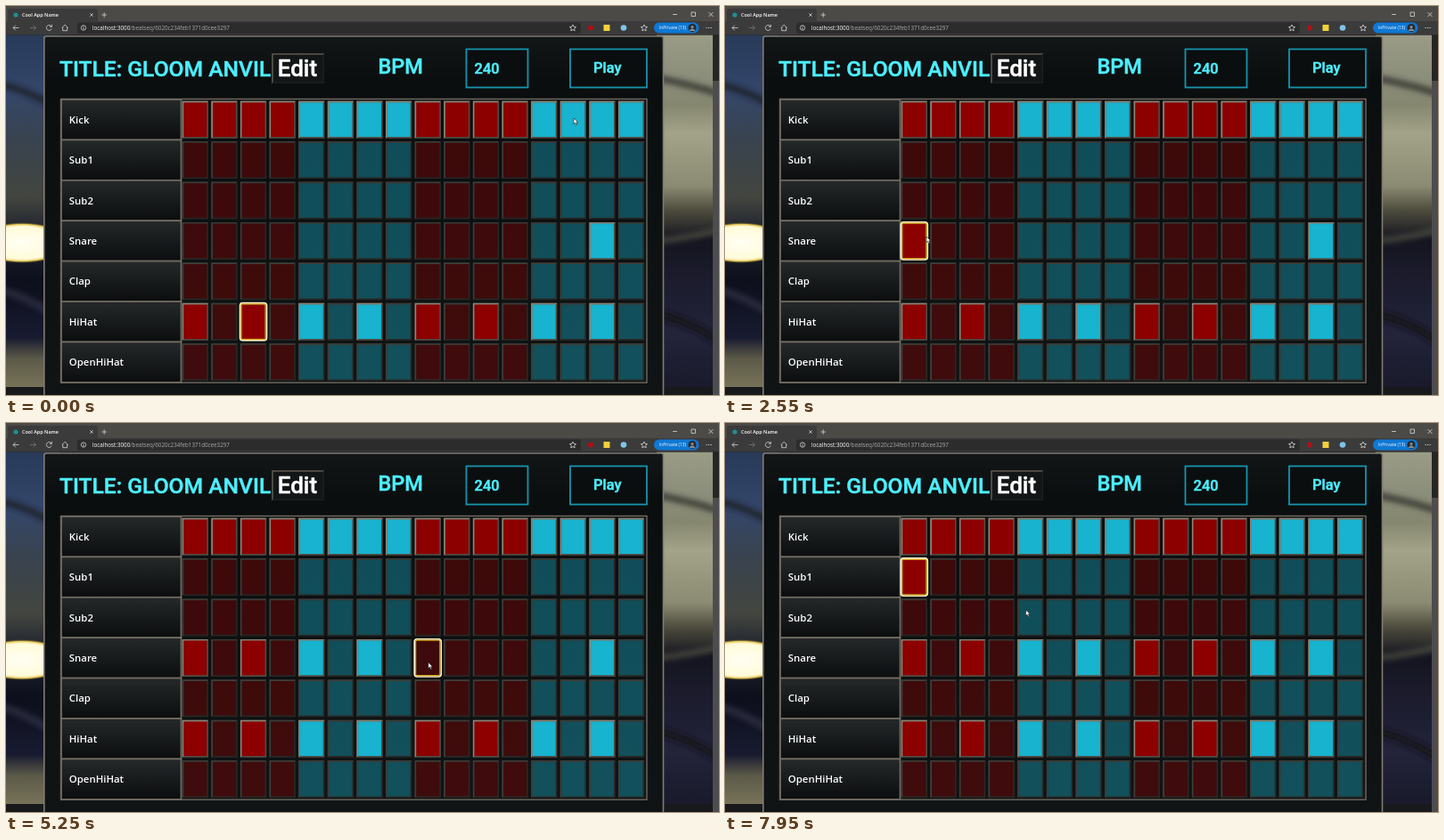
An HTML page for the animation above (8 s loop, 800 by 437 pixels).

```html
<!DOCTYPE html>
<html lang="en">
<head>
<meta charset="utf-8">
<title>Cool App Name</title>
<style>
  html, body { margin: 0; width: 100%; height: 100%; overflow: hidden; background: #17191b; }
  svg { display: block; width: 100vw; height: 100vh; }
  text { white-space: pre; }
  .ui { font-family: "Open Sans", "Noto Sans", sans-serif; }
  .head { font-family: Roboto, "Liberation Sans", sans-serif; font-weight: 500; fill: #4cf0ff; }
  .head text { stroke: #4cf0ff; stroke-width: .5; stroke-linejoin: round; }
  .head .edit { fill: #fff; stroke: #fff; }
  .label { font-size: 11.4px; font-weight: 600; fill: #fff; }
  .icon { fill: none; stroke: #d6d6d6; stroke-width: .8; }
</style>
</head>
<body>
<svg viewBox="0 0 800 437" preserveAspectRatio="none">
  <defs>
    <linearGradient id="panel" x2="0" y2="1">
      <stop offset="0" stop-color="#121617"/><stop offset=".12" stop-color="#0b0e0f"/>
      <stop offset="1" stop-color="#101415"/>
    </linearGradient>
    <linearGradient id="row" x2="0" y2="1">
      <stop offset="0" stop-color="#25292a"/><stop offset="1" stop-color="#0b0d0e"/>
    </linearGradient>
    <linearGradient id="left" x2="0" y2="1">
      <stop offset="0" stop-color="#283a58"/><stop offset=".16" stop-color="#34466a"/>
      <stop offset=".3" stop-color="#39434f"/><stop offset=".46" stop-color="#43463f"/>
      <stop offset=".55" stop-color="#22262f"/><stop offset=".7" stop-color="#0d0f1c"/>
      <stop offset=".86" stop-color="#181a30"/><stop offset=".92" stop-color="#5c5a48"/>
      <stop offset="1" stop-color="#777258"/>
    </linearGradient>
    <linearGradient id="right" x2="0" y2="1">
      <stop offset="0" stop-color="#9a9c86"/><stop offset=".12" stop-color="#8b8e7a"/>
      <stop offset=".2" stop-color="#85876f"/><stop offset=".28" stop-color="#a2a388"/>
      <stop offset=".43" stop-color="#8b8b73"/><stop offset=".5" stop-color="#4c4b3d"/>
      <stop offset=".58" stop-color="#14151f"/><stop offset=".7" stop-color="#1c1c2e"/>
      <stop offset=".85" stop-color="#23233a"/><stop offset="1" stop-color="#1a1a2c"/>
    </linearGradient>
    <radialGradient id="lamp">
      <stop offset="0" stop-color="#fffff4"/><stop offset=".8" stop-color="#fffbd8"/>
      <stop offset=".9" stop-color="#e6c95a"/><stop offset="1" stop-color="#5a4a18" stop-opacity="0"/>
    </radialGradient>
    <filter id="soft"><feGaussianBlur stdDeviation="3"/></filter>
    <clipPath id="photo"><path d="M0 32.500H793V428H0Z"/></clipPath>
  </defs>

  <!-- page backdrop -->
  <g clip-path="url(#photo)">
    <path d="M0 32H60V428H0Z" fill="url(#left)"/>
    <path d="M730 32H793V428H730Z" fill="url(#right)"/>
    <g filter="url(#soft)" fill="none">
      <path d="M-10 88Q20 92 60 116" stroke="#1b212b" stroke-width="7"/>
      <path d="M-10 318Q24 326 60 352" stroke="#2a2b3c" stroke-width="8"/>
      <path d="M725 80Q765 87 805 100" stroke="#3a3b36" stroke-width="7"/>
      <path d="M725 264Q765 262 805 250" stroke="#4a4a40" stroke-width="6"/>
      <path d="M725 345Q765 352 805 380" stroke="#12121d" stroke-width="9"/>
    </g>
    <ellipse cx="18" cy="266" rx="54" ry="23" fill="url(#lamp)"/>
  </g>
  <path d="M793 33H800V437H793Z" fill="#262626"/>
  <path d="M793 84H800V437H793Z" fill="#4d4d4f"/>

  <!-- browser bar -->
  <path d="M0 0H800V18H0Z" fill="#4b4a47"/>
  <path d="M0 17H800V32.500H0ZM2 17V6Q2 3 5 3H100Q103 3 103 6V17Z" fill="#3b3b3b"/>
  <rect x="80" y="18.500" width="565" height="12.500" rx="2" fill="#2c2c2c"/>
  <g class="ui">
    <text x="18" y="12" font-size="5.500" font-weight="600" fill="#fff">Cool App Name</text>
    <text x="97" y="27" font-size="6.270" fill="#aaa"><tspan fill="#fff">localhost:3000</tspan>/beatseq/6020c234feb1371d0cee3297</text>
    <rect x="727" y="18.500" width="50.500" height="12" rx="6" fill="#0f78d4"/>
    <text x="733" y="26.300" font-size="4.900" fill="#fff">InPrivate (13)</text>
  </g>
  <circle cx="11" cy="10" r="2.600" fill="#1f8f98"/>
  <circle cx="656" cy="24.500" r="3" fill="#b01018"/>
  <rect x="670.500" y="21" width="7" height="7" fill="#f2d13c"/>
  <circle cx="693" cy="24.500" r="3.300" fill="#7fc4e8"/>
  <circle cx="770" cy="24.500" r="4.500" fill="#252a30"/>
  <path d="M767 28Q767 25.500 770 25.500T773 28Z" fill="#8b8f94"/>
  <circle cx="770" cy="23.500" r="1.600" fill="#8b8f94"/>
  <g class="icon">
    <path d="M94.300 8.300l3.400 3.400m0-3.400l-3.400 3.400M107.500 10h5.400M110.200 7.300v5.400"/>
    <path d="M748 9.500h5M769 7h4.500v4.500H769ZM788.500 7l5 5m0-5l-5 5"/>
    <path d="M14.500 24.500H8m2.800-2.800L8 24.500l2.800 2.800M62.800 24.500l3.400-3.300 3.400 3.300M63.700 24v3.700h5V24"/>
    <path d="M27 24.500h6.500m-2.800-2.800l2.800 2.800-2.800 2.800" stroke="#777"/>
    <path d="M51 23a3 3 0 1 0 .2 2.500M51.400 20.800v2.500h-2.500"/>
    <circle cx="87" cy="24.500" r="2.700"/><path d="M87 24v2.200M87 22.700v.6"/>
    <path id="star" d="M716 21l1.100 2.300 2.500.3-1.900 1.700.5 2.500-2.200-1.200-2.200 1.200.5-2.500-1.900-1.700 2.500-.3Z"/>
    <use href="#star" x="-80"/>
    <path d="M785.500 24.500h1.200m1.300 0h1.200m1.300 0h1.200" stroke-width="1.100"/>
  </g>

  <!-- sequencer panel -->
  <rect x="42.800" y="34" width="694.700" height="420" rx="2.500" fill="url(#panel)" stroke="#817c73" stroke-width="1.600"/>
  <g class="head">
    <text x="60" y="79" font-size="24.600">TITLE: GLOOM ANVIL</text>
    <path d="M298 53H357V87H298Z" fill="#131617"/>
    <path d="M299 87V54H357" fill="none" stroke="#5d5952" stroke-width="1.600"/>
    <path d="M299 86.300H356.300V54" fill="none" stroke="#1c1f20" stroke-width="1.400"/>
    <text x="304.700" y="79" font-size="26" class="edit">Edit</text>
    <text x="417.500" y="76" font-size="23.500">BPM</text>
    <g fill="#0b0e0f" stroke="#1594ad" stroke-width="1.800">
      <rect x="516.500" y="48.500" width="69" height="43"/>
      <rect x="633" y="48.500" width="86" height="43"/>
    </g>
    <text x="525.500" y="75.700" font-size="16.500">240</text>
    <text x="659" y="75.300" font-size="16.500">Play</text>
  </g>
  <g id="grid"></g>
  <g id="ring" fill="none">
    <rect x="-.4" y="-.2" width="30" height="42.300" rx="3" stroke="#fff6d2" stroke-width="1.600"/>
    <rect x="1" y="1.200" width="27.200" height="39.500" rx="1.500" stroke="#dba614" stroke-width="1.200"/>
  </g>
  <path id="cursor" d="M0 0V6.600L1.600 5.200 2.700 7.700 3.900 7.200 2.800 4.800 4.900 4.700Z" fill="#fff" stroke="#111" stroke-width=".6"/>
</svg>
<script>
const NS = 'http://www.w3.org/2000/svg';
const $ = id => document.getElementById(id);
const LOOP = 8000, LEFT = 197.700, TOP = 105, COL = 32.620, ROW = 45.400;
const rows = ['Kick', 'Sub1', 'Sub2', 'Snare', 'Clap', 'HiHat', 'OpenHiHat'];

// Steps lit at the start
const lit = (r, c) => r === 0 || (r === 3 && c === 14) || (r === 5 && c % 2 === 0);

// Pressed at, lit at, row, column
const clicks = [
  [1900, 2200, 3, 0], [2900, 3000, 3, 2], [3600, 3700, 3, 4], [4450, 4550, 3, 6],
  [5200, 5300, 3, 8], [5800, 5900, 3, 10], [6650, 6750, 3, 12], [7500, 7600, 1, 0]
];

// Pointer: time, x, y
const path = [
  [0, 637, 126], [300, 507, 125], [600, 355, 208], [900, 279, 305], [1250, 212, 265],
  [2500, 212, 265], [2550, 226, 259], [2850, 276, 265], [3000, 277, 266], [3350, 342, 268],
  [3700, 344, 269], [4200, 401, 270], [4350, 408, 270], [4550, 409, 270], [4950, 473, 269],
  [5300, 474, 269], [5650, 538, 268], [5900, 539, 268], [6200, 600, 268], [6600, 604, 268],
  [6750, 603, 267], [7050, 380, 212], [7300, 214, 175], [7600, 215, 175], [7950, 337.500, 210]
];

function add(parent, tag, attrs, text) {
  const el = document.createElementNS(NS, tag);
  for (const k in attrs) el.setAttribute(k, attrs[k]);
  if (text) el.textContent = text;
  return parent.appendChild(el);
}

const at = (r, c) => `translate(${LEFT + c * COL} ${TOP + r * ROW + 1.700})`;
const grid = $('grid');
const cells = rows.map((name, r) => {
  const y = TOP + r * ROW;
  add(grid, 'rect', { x: 62, y, width: 134.500, height: ROW, fill: 'url(#row)', stroke: '#716c62', 'stroke-width': 1.700 });
  add(grid, 'text', { x: 70.800, y: y + 26.700, class: 'ui label' }, name);
  return Array.from({ length: 16 }, (_, c) => {
    const g = add(grid, 'g', { transform: at(r, c) });
    add(g, 'path', { d: 'M0 0H29.300V42H0Z', fill: '#514b43' });
    add(g, 'path', { d: 'M0 42V0H29.300L27.600 1.700H1.700V40.300Z', fill: '#8d8577' });
    add(g, 'path', { d: 'M1.700 1.700H27.600V40.300H1.700Z', fill: c & 4 ? '#17b3cf' : '#8d0000' });
    return g;
  });
});
add(grid, 'rect', { x: 61.500, y: TOP - .500, width: 657.500, height: 7 * ROW + .800, fill: 'none', stroke: '#716c62', 'stroke-width': 1.400 });

function pointer(t) {
  const i = path.findIndex(p => p[0] > t);
  if (i < 0) return path[path.length - 1].slice(1);
  const [a, b] = [path[i - 1], path[i]];
  const k = (t - a[0]) / (b[0] - a[0]);
  return [a[1] + (b[1] - a[1]) * k, a[2] + (b[2] - a[2]) * k];
}

function draw(t) {
  cells.forEach((line, r) => line.forEach((cell, c) => {
    const on = lit(r, c) || clicks.some(k => k[2] === r && k[3] === c && t >= k[1]);
    cell.setAttribute('opacity', on ? 1 : .38);
  }));
  let focus = [5, 2];
  for (const k of clicks) if (t >= k[0]) focus = k.slice(2);
  $('ring').setAttribute('transform', at(...focus));
  $('cursor').setAttribute('transform', `translate(${pointer(Math.floor(t / 50) * 50)})`);
}

const start = performance.now();
function tick(now) {
  draw(Math.max(0, now - start) % LOOP);
  requestAnimationFrame(tick);
}
draw(0);
requestAnimationFrame(tick);
</script>
</body>
</html>
```
